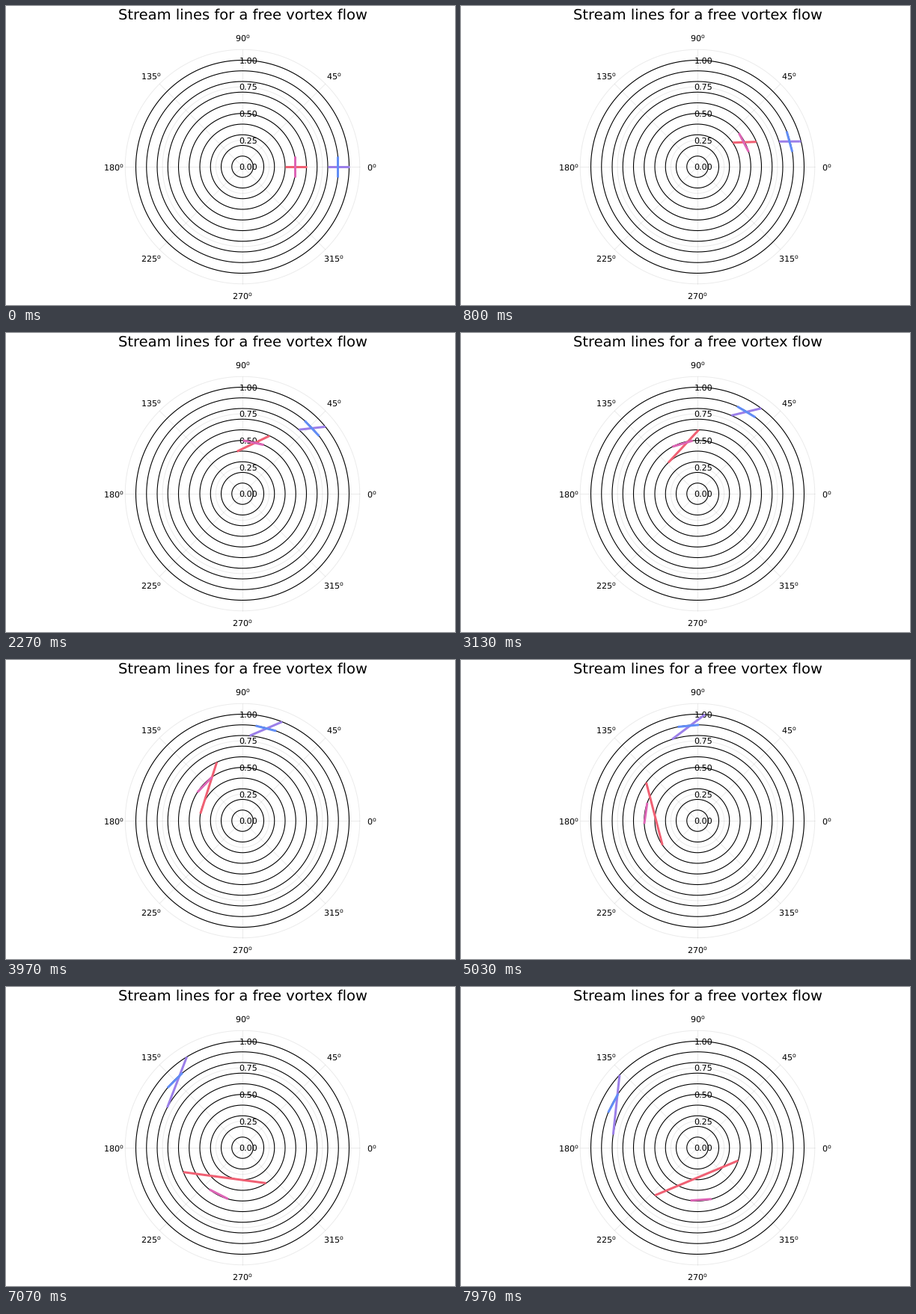
Animation, 600 px wide and 400 px high, one loop 8 s. Source, as a matplotlib script:

```python
import numpy as np
import matplotlib.pyplot as plt
from matplotlib.animation import FuncAnimation

plt.rcParams["font.family"] = "DejaVu Sans"
plt.rcParams["text.hinting"] = "none"

W, H, DPI = 600, 400, 100
FRAMES, LOOP_MS = 240, 8000
CX, CY, UNIT = 316, 215, 142.5   # centre and pixels per unit radius
RIM = 1.1 * UNIT
PX = 72 / DPI                    # points per pixel
ARM = 0.1                        # half length of a cross arm
SPEED = 0.01                     # path length per frame = SPEED * n

fig = plt.figure(figsize=(W / DPI, H / DPI), dpi=DPI, facecolor="white")
ax = fig.add_axes([0, 0, 1, 1])
ax.set_xlim(0, W)
ax.set_ylim(H, 0)
ax.axis("off")


def polar(r, theta):
    return CX + r * np.cos(theta), CY - r * np.sin(theta)


def stroke(x, y, width, color, **kw):
    return ax.plot(x, y, color=color, lw=width * PX,
                   solid_capstyle="butt", **kw)[0]


def ring(r, **style):
    stroke(*polar(r, np.linspace(0, 2 * np.pi, 361)), **style)


def label(x, y, text, size, **kw):
    ax.text(x, y, text, fontsize=size, color="black", ha="center",
            va="baseline", **kw)


def draw_grid():
    faint = dict(width=1, color="black", alpha=0.08)
    for k in range(8):
        a = k * np.pi / 4
        stroke(*polar(np.array([0, RIM]), a), **faint)
        x, y = polar(1.1 * RIM, a)
        label(x, y + 5.5, rf"$\mathregular{{{45 * k}^o}}$", 8)
    for r in np.arange(0, 1.01, 0.25):
        if r:
            ring(r * UNIT, **faint)
        label(CX + 0.05 * RIM, CY - r * UNIT + 4.2, f"{r:.2f}", 8)
    ring(RIM, **faint)


draw_grid()
for k in range(1, 11):
    ring(k / 10 * UNIT, width=1.1, color="black")
label(CX, 18, "Stream lines for a free vortex flow", 14)


def cross(r, radial_color, tangent_color):
    """Two bars, each as (radii, start angles, line)."""
    bars = [((r - ARM, r + ARM), (0, 0), radial_color),
            ((r, r), (-ARM / r, ARM / r), tangent_color)]
    return [(np.array(rs), np.array(a), stroke([], [], 3, c, zorder=5))
            for rs, a, c in bars]


bars = cross(0.9, "#9b7fe9", "#618df6") + cross(0.5, "#f06073", "#dd65b6")


def update(n):
    for r, start, line in bars:
        line.set_data(*polar(r * UNIT, start + SPEED * n / r))
    return [line for *_, line in bars]


anim = FuncAnimation(fig, update, frames=FRAMES, interval=LOOP_MS / FRAMES,
                     init_func=lambda: update(0), repeat=True, repeat_delay=0)
plt.show()
```
